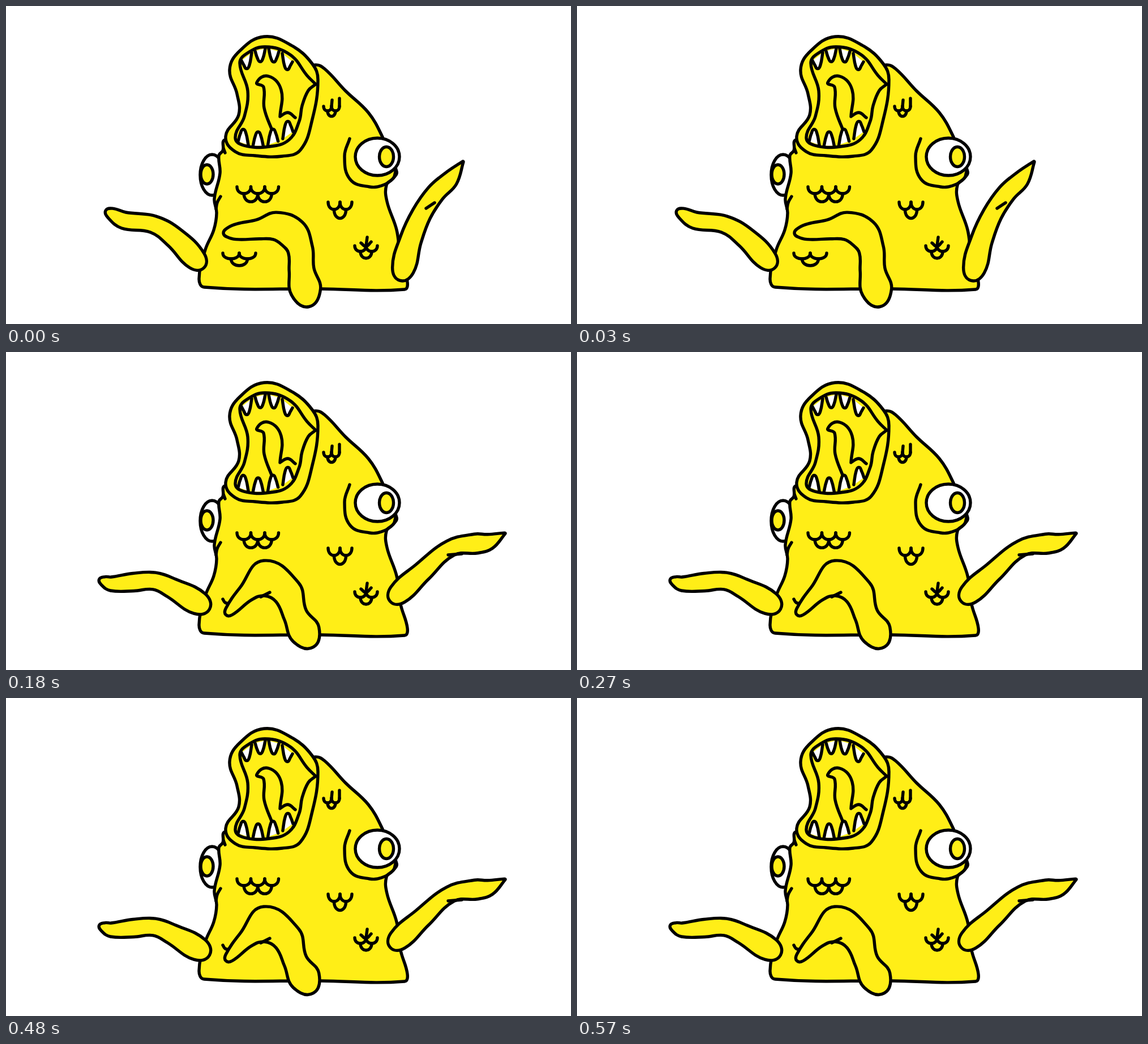
An HTML page for the animation above (630 ms loop, 998x561 px).

```html
<!DOCTYPE html>
<html lang="en">
<head>
<meta charset="utf-8">
<title>Flapping fish monster</title>
<style>
  html, body { margin: 0; width: 100%; height: 100%; overflow: hidden; background: #fff; }
  svg { display: block; width: 100%; height: 100%; }
  path, ellipse { fill: none; stroke: #000; stroke-width: 5.4; stroke-linecap: round; stroke-linejoin: round; }
  .skin { fill: #ffee17; }
  .white { fill: #fff; }
  .pose { visibility: hidden; animation: 630ms step-end infinite; }
  .up { animation-name: up; }
  .mid { animation-name: mid; }
  .down { animation-name: down; }
  @keyframes up { 0% { visibility: visible; } 28.571%, 100% { visibility: hidden; } }
  @keyframes mid {
    0% { visibility: hidden; } 28.571% { visibility: visible; }
    52.381% { visibility: hidden; } 76.19%, 100% { visibility: visible; }
  }
  @keyframes down { 0% { visibility: hidden; } 52.381% { visibility: visible; } 76.19%, 100% { visibility: hidden; } }
</style>
</head>
<body>
<svg id="stage" viewBox="0 0 998 561"></svg>
<script>
const points = text => text.split(' ').map(s => s.split(',').map(Number));
const path = (d, fill = '') => `<path class="${fill}" d="${d}"/>`;
const oval = (x, y, rx, ry, fill) => `<ellipse class="${fill}" cx="${x}" cy="${y}" rx="${rx}" ry="${ry}"/>`;

function unit(a, b) {
  const [x, y] = [b[0] - a[0], b[1] - a[1]];
  const len = Math.hypot(x, y) || 1;
  return [x / len, y / len];
}

// Smooth line through points; handles grow with the length of each span.
function smooth(p, closed) {
  const n = p.length;
  const at = i => closed ? p[(i + n) % n] : p[Math.max(0, Math.min(n - 1, i))];
  let d = 'M' + p[0];
  for (let i = 0; i < (closed ? n : n - 1); i++) {
    const b = at(i), c = at(i + 1);
    const h = 0.39 * Math.hypot(c[0] - b[0], c[1] - b[1]);
    const u = unit(at(i - 1), c), v = unit(b, at(i + 2));
    d += `C${b[0] + u[0] * h},${b[1] + u[1] * h} ${c[0] - v[0] * h},${c[1] - v[1] * h} ${c}`;
  }
  return d + (closed ? 'Z' : '');
}

const line = text => path(smooth(points(text)));
const shape = (text, fill) => path(smooth(points(text), true), fill);

// A limb is a spine of x,y,radius from root to tip, wrapped in skin.
function limb(text) {
  const spine = points(text), last = spine.length - 1;
  const left = [], right = [];
  spine.forEach(([x, y, r], i) => {
    const [tx, ty] = unit(spine[Math.max(0, i - 1)], spine[Math.min(last, i + 1)]);
    if (i === 0) left.push([x - tx * r, y - ty * r]);
    left.push([x + ty * r, y - tx * r]);
    right.unshift([x - ty * r, y + tx * r]);
    if (i === last) left.push([x + tx * r, y + ty * r]);
  });
  return path(smooth([...left, ...right], true), 'skin');
}

// A row of n cups with n - 1 cups hanging below the joints.
function scales(x, y, w, depth, n) {
  const cup = (cx, cy, h) => path(`M${cx},${cy}c0,${h * 4 / 3} ${w},${h * 4 / 3} ${w},0`);
  let out = '';
  for (let i = 0; i < n; i++) {
    out += cup(x + i * w, y, depth);
    if (i) out += cup(x + (i - 0.5) * w, y + depth, depth * 1.2);
  }
  return out;
}

// Four teeth rooted on a curved gum line.
function teeth(x, step, gum, height) {
  let out = '';
  for (let i = 0; i < 4; i++) {
    const c = x + i * step;
    const row = [[c - 9, gum(c - 9)], [c - 5, gum(c) + height * 0.7], [c, gum(c) + height],
      [c + 5, gum(c) + height * 0.7], [c + 9, gum(c + 9)]];
    out += path(smooth(row), 'white');
  }
  return out;
}

const body =
  oval(364, 298, 21, 36, 'white') + oval(355, 297, 11, 17, 'skin') +
  shape('525,115 546,104 563,111 600,150 640,188 664,229 690,292 684,304 672,316 673,345 690,395 697,445 709,487 704,500 ' +
    '556,499 350,496 341,481 352,430 367,395 372,365 368,340 378,295 376,264 383,255 387,236 450,235 500,150', 'skin') +
  line('379,336 373,347 371,358') + line('384,251 387,259') +
  shape('456,54 505,70 541,102 551,130 541,200 520,254 488,265 440,264 405,257 388,230 411,192 408,155 395,112 413,79', 'skin');

const mouth =
  teeth(425, 24, x => 75 + (x - 460) ** 2 / 90, 22) +
  teeth(419, 26.3, x => 247 - (x - 445) ** 2 / 150, -25) +
  line('547,138 532,123 502,86 458,72 425,84 413,101 427,150 421,195 405,232 420,246 465,248 500,236 518,203 523,176 534,149 547,138');

const face =
  scales(408, 319, 24.5, 12, 3) + scales(569, 346, 21, 13, 2) +
  scales(616, 423, 20, 10, 2) + line('638,408 636,423') + line('627,418 636,424 645,416') +
  scales(561, 177, 14, 8, 2) + line('576,166 575,177') + line('589,163 589,177') +
  line('607,234 598,265 608,306 642,319 666,316 684,304 688,292') +
  oval(656, 266, 39, 33, 'white') + oval(672, 266, 12.5, 17.5, 'skin');

const tongue = line('471,222 456,180 455,143 443,135 464,124 486,148 484,195') + line('485,194 498,188 511,197');
const hidden = line('383,436 387,442 394,444');

const poses = {
  up: {
    tongue,
    patch: scales(383, 436, 29, 10, 2),
    limbs: [
      '337,449,18 298,409,18 260,385,15 208,378,14.5 184,365,9',
      '701,466,19 715,412,19 734,367,17 759,330,16 785,305,14 807,275,1',
      '530,505,26 522,465,22 520,430,22 505,401,27 475,388,24 445,394,17 410,398,14 393,400,9'
    ],
    folds: ['757,347 742,357']
  },
  mid: {
    tongue,
    patch: hidden,
    limbs: [
      '342,444,20 292,416,17 262,404,15 225,406,15.5 185,409,12 172,404,8',
      '692,428,18 735,388,17 785,346,14 830,338,17 855,334,13 881,320,1',
      '530,498,26 511,464,21 497,424,26 456,399,31 424,426,15 394,458,8'
    ],
    folds: ['805,356 781,358', '466,424 450,432']
  },
  down: {
    tongue: line('474,218 455,180 443,150 430,144 446,129 474,149 484,190') + line('485,188 493,180 502,186 515,188'),
    patch: line('386,441 394,444 404,440'),
    limbs: [
      '351,421,22 305,417,17.5 272,415,18 235,429,16 200,452,14 182,458,8',
      '688,417,15 715,417,20 765,420,20 812,421,17 848,431,18 878,449,11 909,467,1',
      '531,497,24 499,469,20 467,443,20 432,425,30 418,468,14 408,508,8'
    ],
    folds: ['806,427 818,431 825,438', '444,440 438,447 439,458']
  }
};

document.getElementById('stage').innerHTML = Object.entries(poses).map(([name, p]) =>
  `<g class="pose ${name}">` + body + p.tongue + mouth + face + p.patch +
  p.limbs.map(limb).join('') + p.folds.map(line).join('') + '</g>').join('');
</script>
</body>
</html>
```
